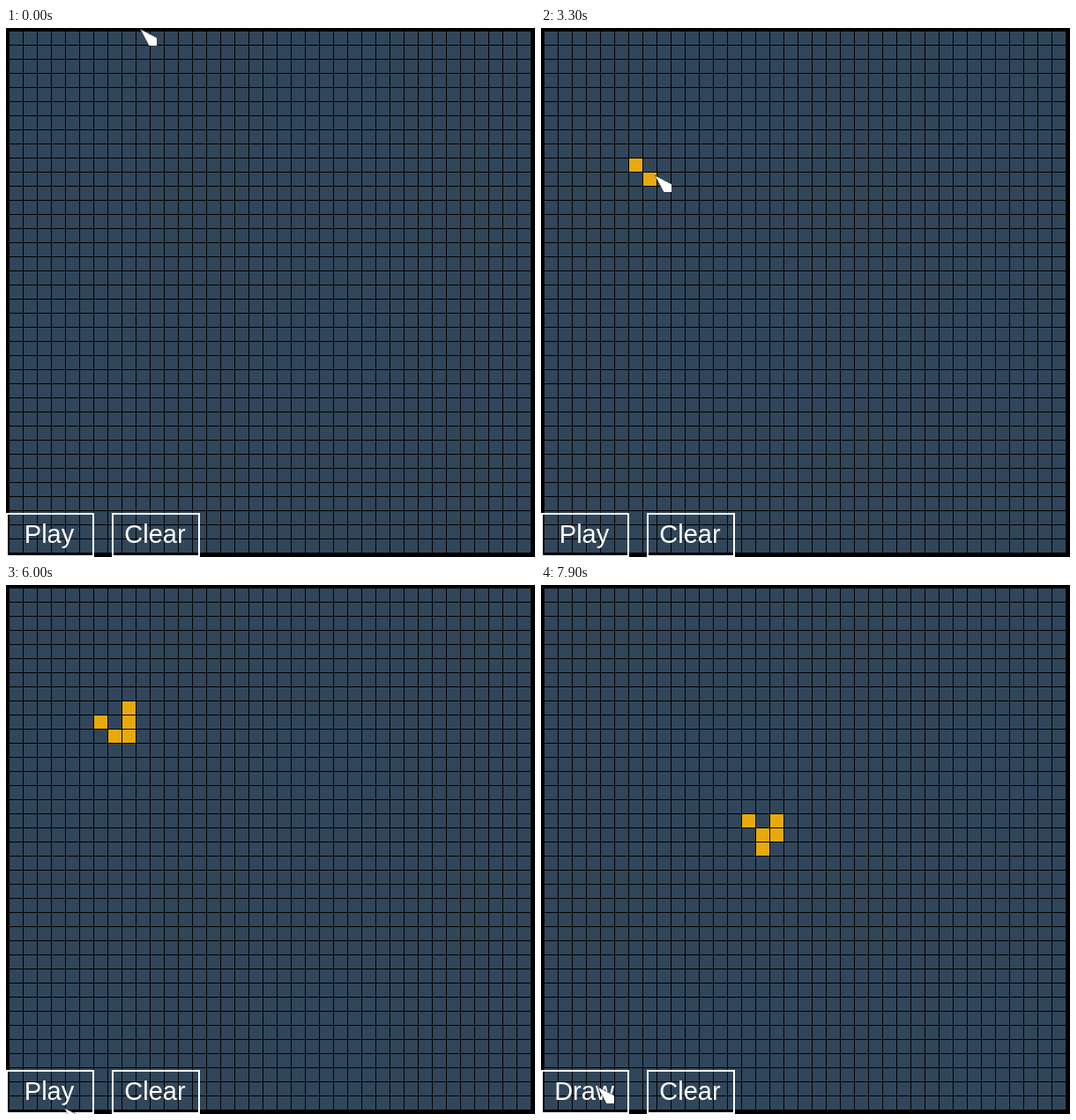
These frames come from a looping animation (600x600 px, 8 s). An HTML page with a canvas:

```html
<!DOCTYPE html>
<html lang="en">
<head>
<meta charset="utf-8">
<title>Game of Life</title>
<style>
html, body { margin: 0; width: 100%; height: 100%; overflow: hidden; background: #000; }
canvas { display: block; width: 600px; height: 600px; }
</style>
</head>
<body>
<canvas id="stage" width="600" height="600"></canvas>
<script>
const ctx = document.getElementById('stage').getContext('2d');
const LOOP = 8000, TICK = 100;
const N = 37, PITCH = 16, EDGE = 4;
const PLAY_AT = 6460, GEN_MS = 600 / 13;

// pointer tip: time, x, y
const path = [
  [0, 152, 1], [200, 193, 75], [500, 152, 217], [700, 97, 198],
  [1100, 109, 158], [1800, 119, 174], [3300, 129, 167], [4000, 140, 172],
  [4700, 143, 153], [5100, 140, 140], [5400, 108, 242], [6000, 66, 593],
  [6400, 64, 569]
];
const clickTimes = [1300, 2800, 4000, 4800, 5100];

function pointerAt(t) {
  const i = path.findIndex(p => p[0] > t);
  if (i < 0) return path[path.length - 1].slice(1);
  const [t0, x0, y0] = path[i - 1], [t1, x1, y1] = path[i];
  const k = (t - t0) / (t1 - t0);
  return [Math.round(x0 + (x1 - x0) * k), Math.round(y0 + (y1 - y0) * k)];
}

// each click fills the cell under the pointer
function drawnCells(t) {
  return clickTimes.filter(c => c <= t)
    .map(c => pointerAt(c).map(v => Math.floor((v - EDGE) / PITCH)));
}

function step(cells) {
  const count = new Map();
  const alive = new Set(cells.map(String));
  for (const [c, r] of cells)
    for (let dx = -1; dx <= 1; dx++)
      for (let dy = -1; dy <= 1; dy++)
        if (dx || dy) {
          const k = `${c + dx},${r + dy}`;
          count.set(k, (count.get(k) || 0) + 1);
        }
  return [...count]
    .filter(([k, n]) => n === 3 || (n === 2 && alive.has(k)))
    .map(([k]) => k.split(',').map(Number));
}

function cellsAt(t) {
  let cells = drawnCells(t);
  for (let g = Math.floor((t - PLAY_AT) / GEN_MS); g > 0; g--) cells = step(cells);
  return cells;
}

function fillCell(c, r, color) {
  ctx.fillStyle = color;
  ctx.fillRect(EDGE + c * PITCH, EDGE + r * PITCH, PITCH - 1, PITCH - 1);
}

function button(x, label) {
  ctx.strokeStyle = '#fff';
  ctx.lineWidth = 2;
  ctx.strokeRect(x + 1, 551, 98, 48);
  ctx.fillStyle = '#fff';
  ctx.fillText(label, x + 49, 584);
}

function pointer(x, y) {
  ctx.fillStyle = '#fff';
  ctx.beginPath();
  ctx.moveTo(x, y);
  ctx.lineTo(x + 19, y + 10);
  ctx.lineTo(x + 19, y + 19);
  ctx.lineTo(x + 10, y + 19);
  ctx.fill();

  ctx.strokeStyle = '#000';
  ctx.lineWidth = 1;
  ctx.setLineDash([1, 1]);
  ctx.beginPath();
  ctx.moveTo(x + 10, y + 19);
  ctx.lineTo(x, y);
  ctx.lineTo(x + 19, y + 10);
  ctx.stroke();
  ctx.setLineDash([]);
}

function draw(t) {
  ctx.fillStyle = '#000';
  ctx.fillRect(0, 0, 600, 600);
  for (let c = 0; c < N; c++)
    for (let r = 0; r < N; r++) fillCell(c, r, '#31465a');
  for (const [c, r] of cellsAt(t)) fillCell(c, r, '#e8a90c');
  ctx.font = '29px "Liberation Sans", Arial, sans-serif';
  ctx.textAlign = 'center';
  button(0, t < PLAY_AT ? 'Play' : 'Draw');
  button(120, 'Clear');
  pointer(...pointerAt(t));
}

const start = performance.now();
function loop() {
  const t = (performance.now() - start) % LOOP;
  draw(Math.floor(t / TICK) * TICK);
  requestAnimationFrame(loop);
}
loop();
</script>
</body>
</html>
```
